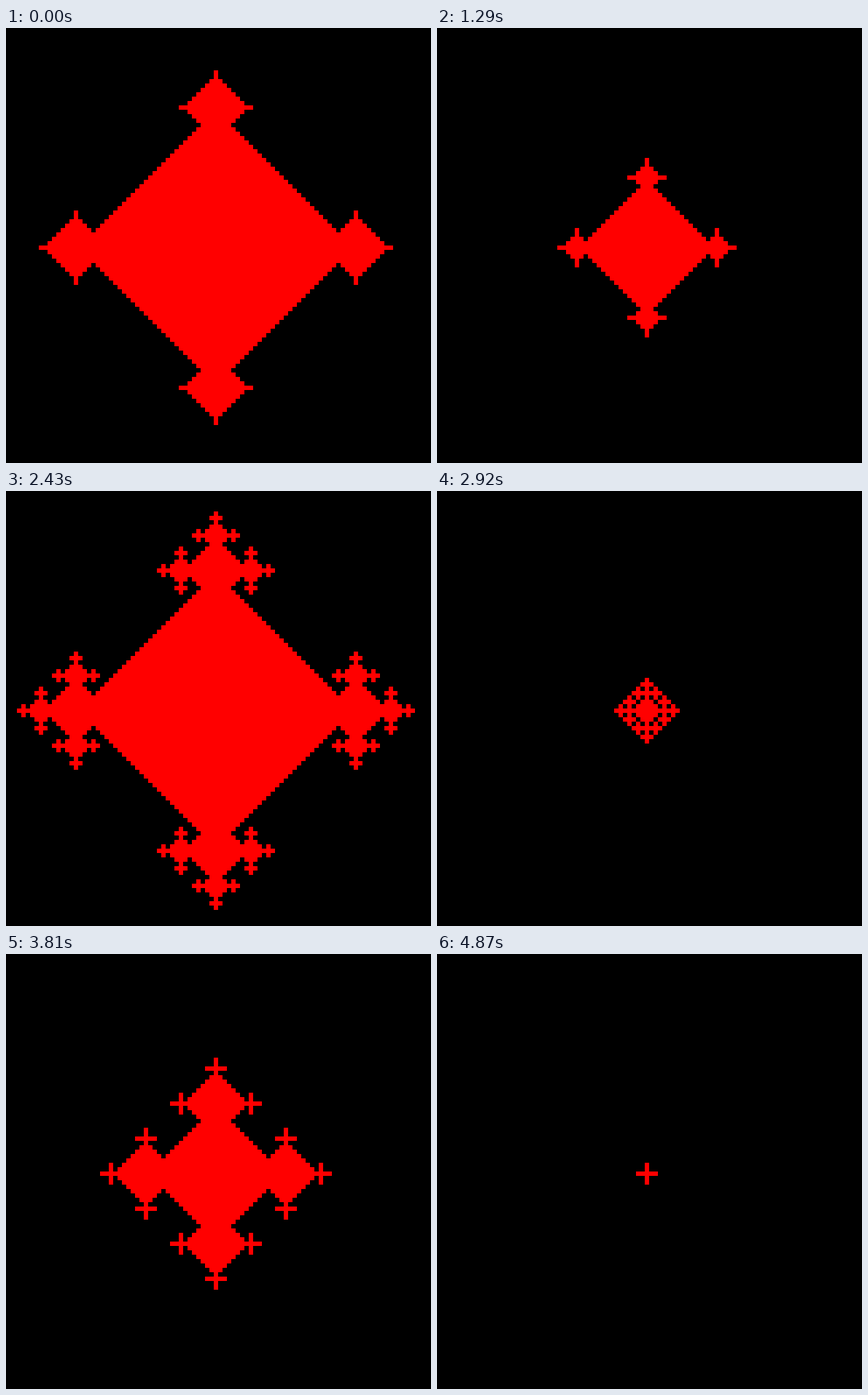
An HTML page with a canvas for the animation above (4.93 s loop, 583 by 596 pixels).

```html
<!DOCTYPE html>
<html lang="en">
<head>
<meta charset="utf-8">
<title>Growing diamond automaton</title>
<style>
  html, body { margin: 0; width: 100%; height: 100%; overflow: hidden; background: #000; }
  canvas { display: block; }
</style>
</head>
<body>
<canvas id="stage" width="583" height="596"></canvas>
<script>
const canvas = document.getElementById('stage');
const ctx = canvas.getContext('2d');
const CELL = 6, RADIUS = 47, GENERATIONS = RADIUS + 1;
const CENTER_X = 285, CENTER_Y = 298;
const SIZE = 2 * RADIUS + 3, MID = RADIUS + 1;
const LOOP = 4930;

// Key points of the pace; growth is steady between them and rests after the last.
const KEYS = [
  { time: 0, count: 40 },
  { time: 1800, count: 79.4 },
  { time: 3810, count: 122.8 },
  { time: 4470, count: 136.9 },
  { time: 4870, count: 146.1 }
];

// A cell is born when exactly one or all four of its neighbours are alive.
function grow(cells) {
  const next = cells.slice();
  for (let y = 1; y < SIZE - 1; y++) {
    for (let x = 1; x < SIZE - 1; x++) {
      const i = y * SIZE + x;
      const n = cells[i - 1] + cells[i + 1] + cells[i - SIZE] + cells[i + SIZE];
      if (n === 1 || n === 4) next[i] = 1;
    }
  }
  return next;
}

const history = [new Uint8Array(SIZE * SIZE)];
history[0][MID * SIZE + MID] = 1;
while (history.length < GENERATIONS) history.push(grow(history[history.length - 1]));

// Growth restarts from a single cell once it reaches the edge of the grid.
function generationAt(time) {
  const k = KEYS.findIndex(key => key.time > time);
  if (k < 0) return Math.floor(KEYS[KEYS.length - 1].count) % GENERATIONS;
  const a = KEYS[k - 1], b = KEYS[k];
  const progress = (time - a.time) / (b.time - a.time);
  return Math.floor(a.count + (b.count - a.count) * progress) % GENERATIONS;
}

function draw(cells) {
  ctx.fillStyle = '#000';
  ctx.fillRect(0, 0, canvas.width, canvas.height);
  ctx.fillStyle = '#f00';
  cells.forEach((alive, i) => {
    if (!alive) return;
    const dx = i % SIZE - MID, dy = Math.floor(i / SIZE) - MID;
    ctx.fillRect(CENTER_X + dx * CELL, CENTER_Y + dy * CELL, CELL, CELL);
  });
}

const start = performance.now();
function tick() {
  draw(history[generationAt((performance.now() - start) % LOOP)]);
  requestAnimationFrame(tick);
}
tick();
</script>
</body>
</html>
```
